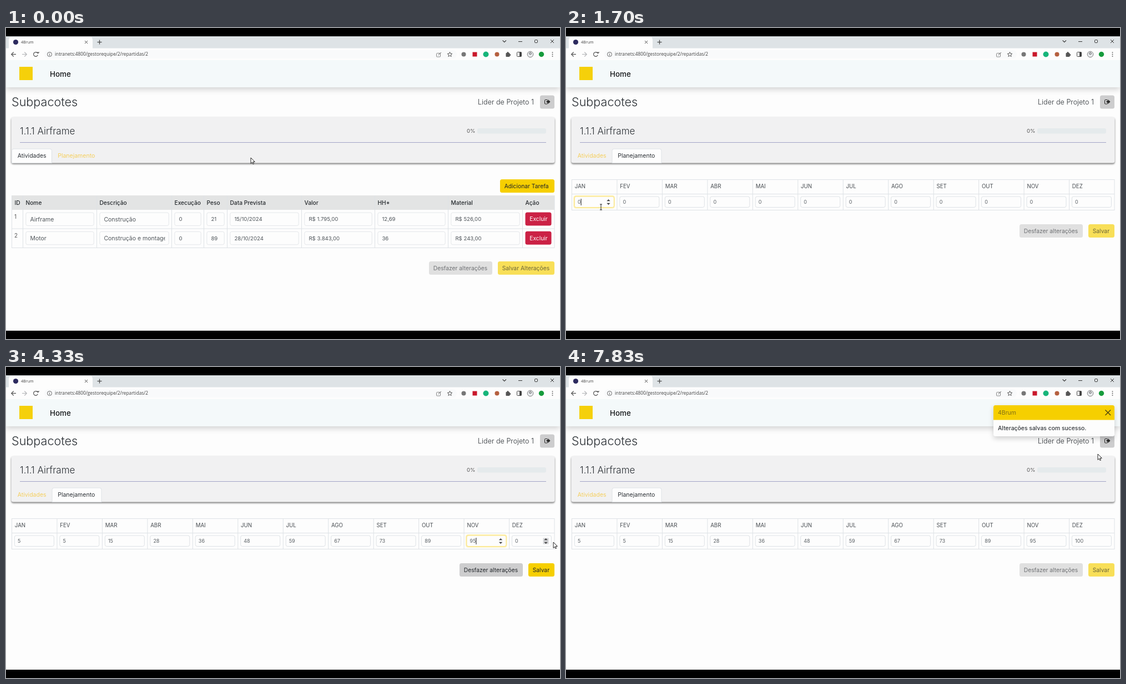
These frames come from a looping animation (998 px wide and 561 px high, 8000 ms). An HTML page with a canvas:

```html
<!DOCTYPE html>
<html lang="pt-BR">
<head>
<meta charset="utf-8">
<title>Subpacotes</title>
<style>
html, body { margin: 0; width: 100%; height: 100%; overflow: hidden; background: #000; }
canvas { display: block; width: 998px; height: 561px; }
</style>
</head>
<body>
<canvas id="stage" width="998" height="561"></canvas>
<script>
const c = document.getElementById('stage').getContext('2d');
const LOOP = 8000, BRAND = '4Brum';
const UI = 'Inter, sans-serif', SYS = '"Open Sans", sans-serif';
const PAPER = '#fdfdfd', DARK = '#2b3035', ICON = '#555', LINE = '#dee2e6', GREY = '#cdcdce', YELLOW = '#f6cf00';

const clamp = v => Math.max(0, Math.min(1, v));
const ramp = (t, from, len = 150) => clamp((t - from) / len);
const ease = k => k * k * (3 - 2 * k);
const inside = (p, x, y, w, h) => p.x > x && p.x < x + w && p.y > y && p.y < y + h;

function text(s, x, y, size, color = DARK, weight = 400, font = UI) {
  c.font = `${weight} ${size}px ${font}`;
  c.fillStyle = color;
  c.fillText(s, x, y + size * 0.36);
}
function paint(fill, stroke, width = 1) {
  if (fill) { c.fillStyle = fill; c.fill(); }
  if (stroke) { c.strokeStyle = stroke; c.lineWidth = width; c.stroke(); }
}
function box(x, y, w, h, r, fill, stroke) {
  c.beginPath();
  c.roundRect(x, y, w, h, r);
  paint(fill, stroke);
}
function dot(x, y, r, fill, stroke) {
  c.beginPath();
  c.arc(x, y, r, 0, 7);
  paint(fill, stroke);
}
function line(x1, y1, x2, y2, color = LINE, width = 1) {
  c.beginPath();
  c.moveTo(x1, y1);
  c.lineTo(x2, y2);
  paint(null, color, width);
}
function cross(x, y, r, color, width = 1) {
  line(x - r, y - r, x + r, y + r, color, width);
  line(x - r, y + r, x + r, y - r, color, width);
}
// V-shaped tip at (x, y) pointing along (dx, dy)
function chevron(x, y, r, dx, dy, color, filled) {
  c.beginPath();
  c.moveTo(x - r * (dx + dy), y - r * (dy + dx));
  c.lineTo(x, y);
  c.lineTo(x - r * (dx - dy), y - r * (dy - dx));
  filled ? paint(color) : paint(null, color, 1.2);
}
function faded(alpha, draw) {
  c.save();
  c.globalAlpha *= alpha;
  draw();
  c.restore();
}
function shadowed(blur, dy, alpha, draw) {
  c.save();
  c.shadowColor = `rgba(0,0,0,${alpha})`;
  c.shadowBlur = blur;
  c.shadowOffsetY = dy;
  draw();
  c.restore();
}
function button(label, x, y, w, fill, color = '#212529', alpha = 1) {
  faded(alpha, () => {
    box(x, y, w, 24, 3.5, fill);
    text(label, x + 7.7, y + 12, 10.3, color);
  });
}

// Form timeline
const SWITCH = 740, EDITED = 2330, BLUR = 6080, SAVED = 6290;
const MONTHS = 'JAN FEV MAR ABR MAI JUN JUL AGO SET OUT NOV DEZ'.split(' ');
const VALUES = '5 5 15 28 36 48 59 67 73 89 95 100'.split(' ');
const LEFT = 10.5, COL = 977.5 / 12, LAST = 11;
const colX = i => LEFT + i * COL;
const focusAt = i => i > LAST ? BLUR : i === LAST ? 4700 : i ? 2540 + (i - 1) * 175 : 1600;
const keyAt = (i, n) => i === LAST ? 4900 + n * 150 : i ? focusAt(i) + 80 + n * 50 : EDITED;
const typed = (i, t) => [...VALUES[i]].filter((_, n) => t >= keyAt(i, n)).join('');

// Pointer moves: start, duration, destination
const MOVES = [
  [100, 460, 116, 229],
  [830, 620, 63, 323],
  [1850, 300, 9, 307],
  [3950, 330, 986, 316],
  [5300, 550, 964, 368],
  [6700, 270, 972, 270],
  [7230, 400, 962, 150],
  [7770, 60, 958, 157]
];
function pointerAt(t) {
  let x = 441, y = 234;
  for (const [from, len, tx, ty] of MOVES) {
    const k = ease(ramp(t, from, len));
    x += (tx - x) * k;
    y += (ty - y) * k;
  }
  return { x, y };
}

const TABS = [
  { label: 'Atividades', x: LEFT, w: 72 },
  { label: 'Planejamento', x: 83, w: 89 }
];
const overTab = (m, i) => inside(m, TABS[i].x, 218, TABS[i].w, 25);
const overSave = (m, t) => t > EDITED && t < SAVED && inside(m, 941, 354, 47, 24);

function star(x, y, r) {
  c.beginPath();
  for (let i = 0; i < 10; i++) {
    const a = (i / 5 - 0.5) * Math.PI, d = i % 2 ? r * 0.45 : r;
    c.lineTo(x + d * Math.cos(a), y + d * Math.sin(a));
  }
  c.closePath();
  paint(null, ICON);
}

function titleBar() {
  box(0, 15, 998, 21.5, 0, '#dee3e6');
  box(5, 16, 151, 24, [5, 5, 0, 0], PAPER);
  dot(17.5, 25.5, 4.6, '#2c2a5e');
  text(BRAND, 27, 25.5, 7.2, '#444', 400, SYS);
  cross(144.5, 25.5, 2.5, '#444');
  line(164.5, 25.5, 172.5, 25.5, '#444', 1.2);
  line(168.5, 21.5, 168.5, 29.5, '#444', 1.2);
  chevron(897.8, 25.5, 3.2, 0, 1, '#333');
  line(923, 24.5, 930, 24.5, '#333');
  box(952.5, 21.5, 5, 5, 1, null, '#333');
  cross(984, 24, 3, '#333');
}

function toolBar() {
  const y = 47.5;
  box(0, 36, 998, 22, 0, PAPER);
  box(69, 40, 743, 15, 7.5, '#f9fafb');
  line(10, y, 18, y, ICON, 1.3);
  chevron(9.7, y, 4, -1, 0, ICON);
  line(29, y, 37, y, '#b5b7ba', 1.2);
  chevron(37.3, y, 4, 1, 0, '#b5b7ba');
  c.beginPath();
  c.arc(53.5, y, 3.8, 0.3, 5.4);
  paint(null, ICON, 1.3);
  chevron(57.5, 46.5, 3, 0, 1, ICON, true);
  dot(78.5, y, 4, null, '#666');
  line(78.5, 47, 78.5, 50, '#666');
  line(78.5, 45, 78.5, 46, '#666');
  text('intranets:4800/gestorequipe/2/repartidas/2', 88, y, 8.3, '#444', 400, SYS);

  box(775.5, 45.5, 7, 6.5, 1, null, '#888');
  line(778.5, 49, 784, 44, '#666');
  star(799.5, 47.8, 4.5);
  dot(824.5, y, 4, '#777');
  box(840.5, 43.5, 8, 8, 0, '#c9182b');
  dot(864.5, y, 5, '#17b57a');
  dot(884.5, y, 4, '#b5603f');
  box(900.5, 45, 7, 7, 1, ICON);
  dot(904, 44.6, 1.6, ICON);
  dot(907.8, 48.5, 1.5, ICON);
  box(920.5, 43.5, 8, 8, 1, null, '#444');
  box(925, 43.5, 3.5, 8, 0, '#444');
  dot(944.5, y, 5.3, '#e9ebee', '#777');
  dot(944.5, 46, 1.8, null, ICON);
  dot(964.5, y, 4.7, '#169b3c');
  for (let i = -1; i < 2; i++) dot(984.5, y + i * 3.4, 0.9, ICON);
}

function header() {
  shadowed(10, 4, 0.17, () => box(0, 58, 998, 49, 0, '#f4f9fa'));
  box(24, 70, 24, 24, 0, '#f5d00a');
  text('Home', 79, 83, 13.4, '#151719', 500);
  text('Subpacotes', 10, 133, 21.6, DARK, 300);
  text('Lider de Projeto 1', 850, 133, 12.6, DARK, 300);
  box(962, 121.5, 26, 24, 3.5, GREY);
  box(970.5, 129.5, 5, 7.5, 1, null, '#222');
  line(973.5, 133, 978, 133, '#222', 2);
  chevron(980.5, 133, 4, 1, 0, '#222', true);
}

function card(view, mouse) {
  shadowed(3, 2, 0.5, () => box(9.5, 160.5, 979, 83, 4, '#f1f1f2'));
  text('1.1.1 Airframe', 25, 185.5, 17, DARK, 300);
  text('0%', 830, 185.5, 9.6, ICON);
  box(849, 181, 124, 9.5, 3, '#e5eaec');
  line(25, 206.5, 973, 206.5, '#a2a4c6');
  TABS.forEach(({ label, x, w }, i) => {
    const active = i === view, over = overTab(mouse, i);
    if (active) box(x, 218, w, 25.5, [3.5, 3.5, 0, 0], PAPER, LINE);
    else if (over) box(x, 218, w, 25, [3.5, 3.5, 0, 0], null, '#e9ebec');
    text(label, x + 10.2, 230, 10.5, active ? DARK : over ? '#d3b264' : '#f5cf5c');
  });
}

// Each column: heading, width, cell values
const TASKS = [
  ['ID', 20, '1', '2'],
  ['Nome', 133, 'Airframe', 'Motor'],
  ['Descrição', 135, 'Construção', 'Construção e montagem'],
  ['Execução', 58, '0', '0'],
  ['Peso', 42, '21', '89'],
  ['Data Prevista', 134, '15/10/2024', '28/10/2024'],
  ['Valor', 132, 'R$ 1.795,00', 'R$ 3.843,00'],
  ['HH*', 132, '12,69', '36'],
  ['Material', 134, 'R$ 526,00', 'R$ 243,00'],
  ['Ação', 57.5, 'Excluir', 'Excluir']
];
function taskCell(value, col, x, y, w) {
  if (col === 0) return text(value, x + 4.5, y + 12.5, 9.8, ICON);
  if (col === TASKS.length - 1) return button(value, x + 5, y + 4.5, 47, '#cb2145', '#fff');
  box(x + 5.3, y + 5, w - 10.6, 23.5, 3, PAPER, '#e4e7ea');
  c.save();
  c.beginPath();
  c.rect(x + 12, y, w - 24, 34);
  c.clip();
  text(value, x + 12.9, y + 16.8, col < 3 ? 10.5 : 9.6, '#50565b');
  c.restore();
}
function activities() {
  button('Adicionar Tarefa', 890, 273, 98, YELLOW);
  box(10, 302, 978, 26, 0, '#e3e4e4');
  let x = LEFT;
  TASKS.forEach(([head, w, ...cells], col) => {
    text(head, x + 5, 315, 10.2, '#25292d', 500);
    cells.forEach((v, r) => taskCell(v, col, x, 328 + r * 34.3, w));
    line(x, 302, x, 396.5);
    x += w;
  });
  line(x, 302, x, 396.5);
  for (const y of [362, 396.5]) line(10, y, 988, y);
  button('Desfazer alterações', 762, 421, 114, GREY, '#212529', 0.6);
  button('Salvar Alterações', 886, 421, 102, YELLOW, '#212529', 0.65);
}

function monthField(i, t, mouse) {
  const x = colX(i), on = focusAt(i), off = focusAt(i + 1);
  const focused = t >= on && t < off, value = typed(i, t), shown = value || '0';
  const glow = ramp(t, on, 100) - ramp(t, off, 100);
  const hover = inside(mouse, x, 303, COL, 22);
  const selected = focused && !value && (i > 0 || t > 2010);

  faded(glow, () => box(x + 3, 302, 74.5, 23.5, 4.5, '#fcefb0'));
  box(x + 4.9, 304, 71, 19.5, 3, PAPER, glow > 0.5 ? '#fae484' : LINE);
  c.font = `400 9px ${UI}`;
  const w = c.measureText(shown).width;
  if (selected) box(x + 10.3, 307, w + 0.6, 13.5, 0, '#3390f5');
  text(shown, x + 10.5, 313.8, 9, selected ? '#fff' : '#5b6166');
  if (focused && !selected && (t - on) % 1000 < 600) line(x + 11 + w, 308, x + 11 + w, 320, '#222');
  if (focused || hover) {
    if (hover && mouse.x > x + 61) box(x + 61, 308.5, 10, 11, 0, '#d4d5d8');
    chevron(x + 66, 309, 3.2, 0, -1, '#444', true);
    chevron(x + 66, 319, 3.2, 0, 1, '#444', true);
  }
}
function planning(t, mouse) {
  for (const y of [273.5, 299.5, 328.5]) line(10, y, 988, y);
  for (let i = 0; i <= 12; i++) line(colX(i), 273, colX(i), 329);
  MONTHS.forEach((m, i) => {
    text(m, colX(i) + 5.3, 286, 9.7, '#484d52');
    monthField(i, t, mouse);
  });
  const live = ramp(t, EDITED) - ramp(t, SAVED);
  button('Desfazer alterações', 817, 354, 114, GREY, '#212529', 0.6 + 0.4 * live);
  button('Salvar', 941, 354, 47, overSave(mouse, t) ? '#f7d833' : YELLOW, '#212529', 0.65 + 0.35 * live);
}

function toast(t) {
  faded(ramp(t, SAVED), () => {
    shadowed(10, 4, 0.18, () => box(770, 69, 218, 56, 3.5, PAPER));
    box(770, 69, 218, 26.5, [3.5, 3.5, 0, 0], YELLOW);
    text(BRAND, 778, 82, 10.5, '#806f16');
    cross(976.3, 82.3, 4.8, '#4d450f', 1.4);
    text('Alterações salvas com sucesso.', 778, 110, 10.4, '#33373b', 500);
  });
}

function pointerKind(t, m, view) {
  if (overTab(m, 1 - view) || overSave(m, t)) return hand;
  const dx = (m.x - LEFT) % COL;
  return view && inside(m, LEFT, 303, 977, 22) && dx > 5 && dx < 61 ? beam : arrow;
}
function beam() {
  line(0, -5, 0, 5, '#222');
  for (const y of [-5, 5]) line(-2, y, 2, y, '#222');
}
function hand() {
  c.beginPath();
  c.roundRect(-1.2, 0, 2.6, 9, 1.3);
  c.roundRect(-3, 5.5, 9.5, 8.5, 3);
  paint(null, '#222', 2);
  paint('#fff');
  for (const x of [1.6, 3.8]) line(x, 5.5, x, 8, '#222', 0.8);
}
function arrow() {
  c.beginPath();
  c.lineTo(0, 0);
  c.lineTo(0, 10.5);
  c.lineTo(2.4, 8.2);
  c.lineTo(4, 11.6);
  c.lineTo(5.6, 10.9);
  c.lineTo(4, 7.5);
  c.lineTo(7.3, 7.4);
  c.closePath();
  paint('#fff', '#222');
}

function draw(t) {
  const mouse = pointerAt(t), view = t < SWITCH ? 0 : 1;
  box(0, 0, 998, 561, 0, '#000');
  box(0, 15, 998, 531, 0, PAPER);
  header();
  toolBar();
  titleBar();
  card(view, mouse);
  view ? planning(t, mouse) : activities();
  toast(t);
  c.save();
  c.translate(mouse.x, mouse.y);
  pointerKind(t, mouse, view)();
  c.restore();
}

const start = performance.now();
function tick() {
  draw((performance.now() - start) % LOOP);
  requestAnimationFrame(tick);
}
tick();
</script>
</body>
</html>
```
